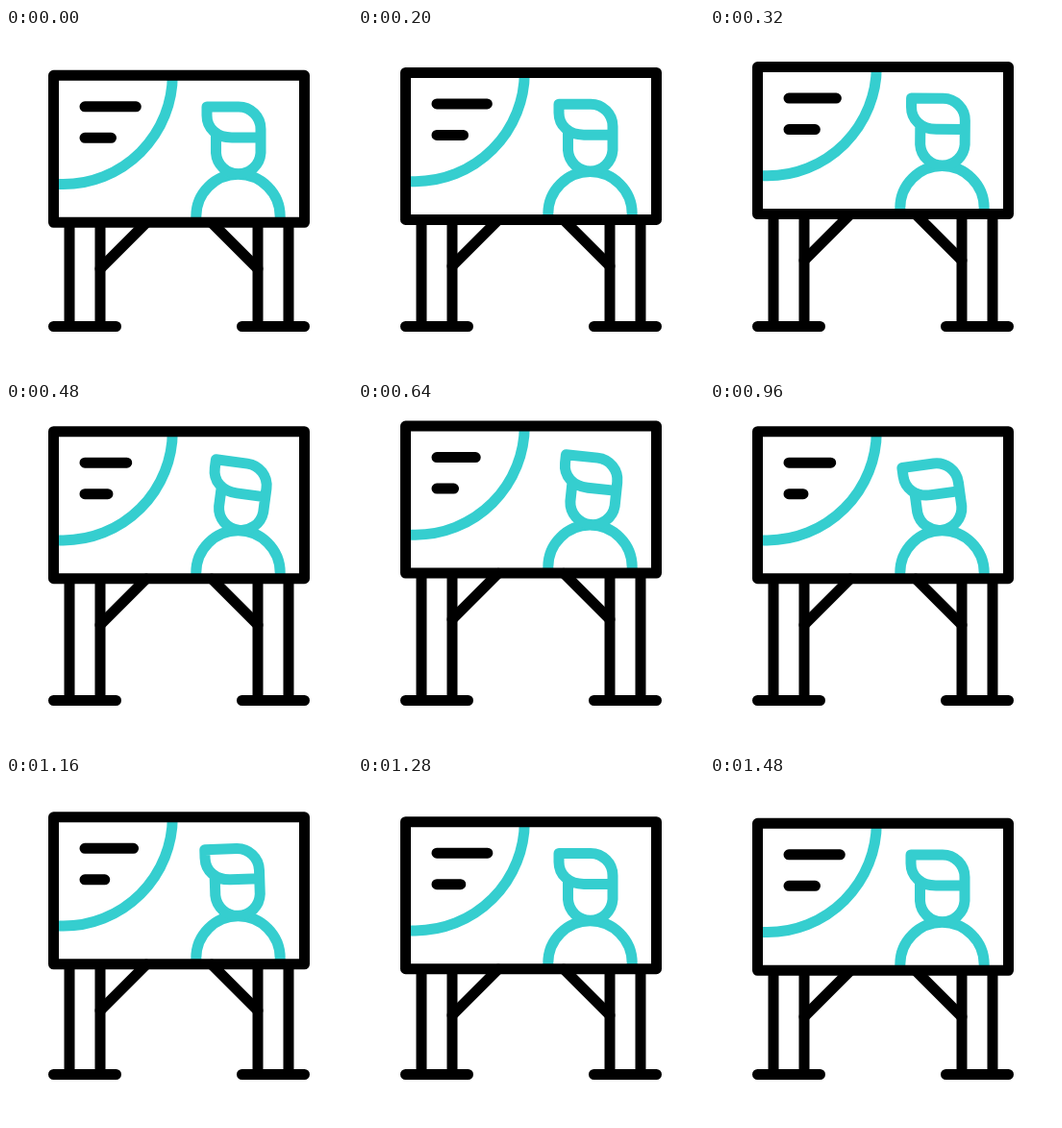
These frames come from a looping animation (360 by 360 pixels, 1.6 s). An HTML page:

```html
<!DOCTYPE html>
<html lang="en">
<head>
<meta charset="utf-8">
<title>Billboard</title>
<style>
  html, body { margin: 0; width: 100%; height: 100%; overflow: hidden; background: #fff; }
  svg { display: block; width: 100vw; height: 100vh; }
  g { fill: none; stroke-width: 11; stroke-linejoin: round; }
</style>
</head>
<body>
<svg viewBox="0 0 360 360">
  <g stroke="#000">
    <path id="legs"/>
    <path d="M49.5 310.5H114.5M245.5 310.5H310.5" stroke-linecap="round"/>
  </g>
  <g id="board">
    <g stroke="#35cecf">
      <path d="M52 162.5H59.6A113.7 113.7 0 0 0 173.3 49M197.8 200V196A43.7 43.7 0 0 1 285.2 196V200"/>
      <path id="head" d="M265 114H235C219 114 209 104 209 91V82H242A23 23 0 0 1 265 105V130A23.3 23.3 0 0 1 218.5 130V109"/>
    </g>
    <g stroke="#000" stroke-linecap="round">
      <path d="M49.5 49.3H310.5V202.3H49.5Z"/>
      <path d="M98 250.5L146 202.5M262 250.5L214 202.5"/>
      <path id="lines"/>
    </g>
  </g>
</svg>
<script>
const LOOP = 1600, STEP = 40;
const [legs, board, head, lines] = ['legs', 'board', 'head', 'lines'].map(id => document.getElementById(id));

// Keys are [step, value] pairs, eased in and out between neighbours.
const lift = [[1, 0], [18, -25], [35, 0]];
const longLine = [[2, 135.3], [18, 121.8], [34, 135.3]];
const shortLine = [[7, 109.5], [21, 96], [37, 109.5]];
const tilt = [[7, 0], [13, 8], [25, -8], [31, 0]];

function ease(t) {
  const a = t ** 1.75, b = (1 - t) ** 1.75;
  return a / (a + b);
}

function at(keys, step) {
  if (step <= keys[0][0]) return keys[0][1];
  for (let i = 1; i < keys.length; i++) {
    const [s0, v0] = keys[i - 1], [s1, v1] = keys[i];
    if (step <= s1) return v0 + (v1 - v0) * ease((step - s0) / (s1 - s0));
  }
  return keys[keys.length - 1][1];
}

function draw() {
  const step = Math.floor(performance.now() % LOOP / STEP);
  const y = at(lift, step);
  board.setAttribute('transform', `translate(0 ${y})`);
  head.setAttribute('transform', `rotate(${at(tilt, step)} 241.5 152)`);
  lines.setAttribute('d', `M82 81.8H${at(longLine, step)}M82 114.3H${at(shortLine, step)}`);
  legs.setAttribute('d', [66, 98, 262, 294].map(x => `M${x} 310V${202 + y}`).join(''));
  requestAnimationFrame(draw);
}
draw();
</script>
</body>
</html>
```
